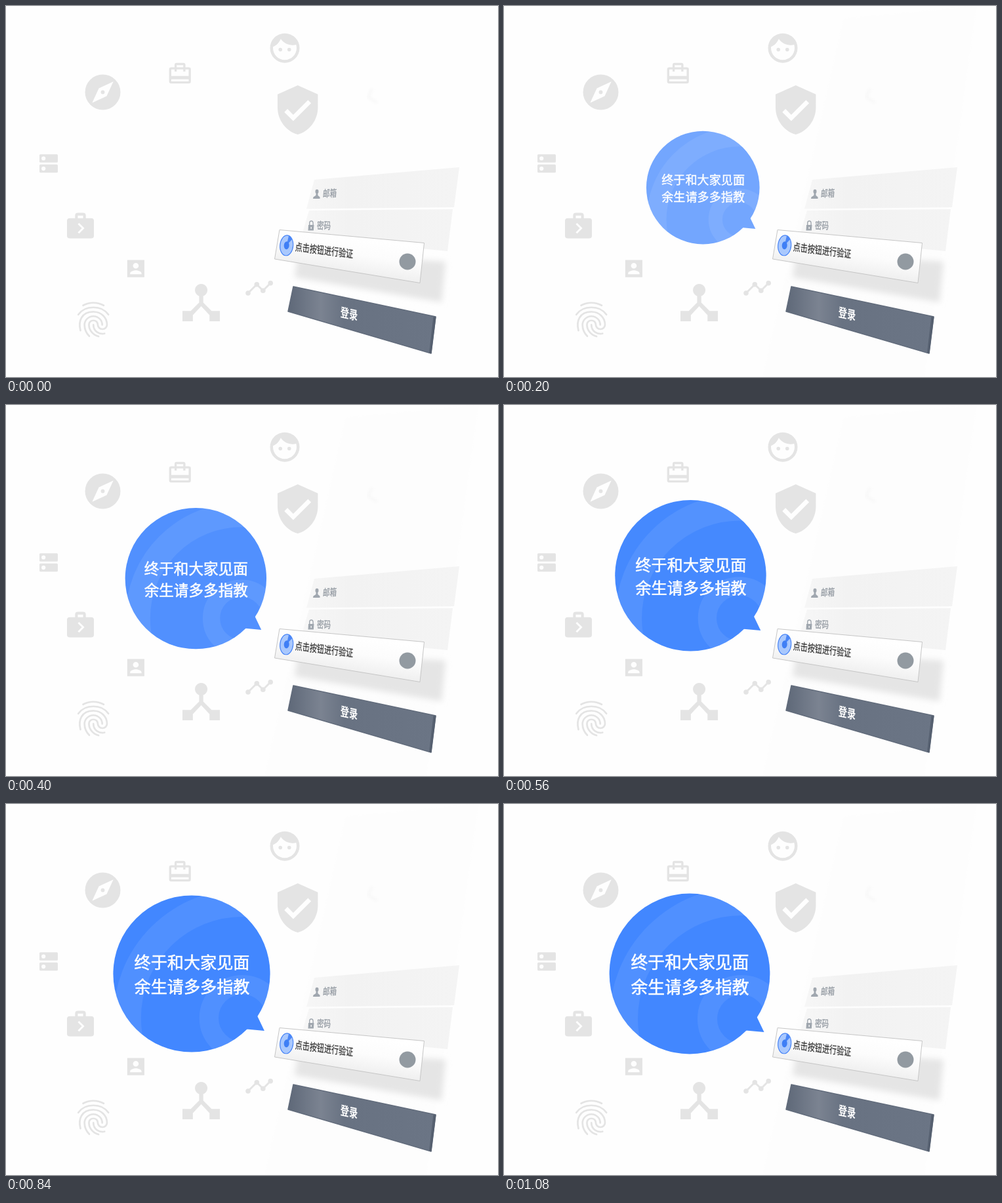
An HTML page for the animation above (2.4 s loop, 750x566 px).

```html
<!DOCTYPE html>
<html lang="zh">
<head>
<meta charset="utf-8">
<title>登录验证</title>
<style>
  html, body { margin: 0; width: 100%; height: 100%; overflow: hidden; background: #fefefe; }
  svg { display: block; width: 100%; height: 100%; }
  text { font-family: "Noto Sans CJK SC", "Noto Sans CJK", sans-serif; text-anchor: middle; }
</style>
</head>
<body>
<svg viewBox="0 0 750 566">
  <defs>
    <filter id="soft" x="-20%" y="-40%" width="140%" height="180%"><feGaussianBlur stdDeviation="5"/></filter>
    <filter id="faint"><feGaussianBlur stdDeviation="2"/></filter>
    <linearGradient id="field"><stop offset="0" stop-color="#f7f7f7"/><stop offset=".3" stop-color="#f2f2f2"/><stop offset="1" stop-color="#f4f4f4"/></linearGradient>
    <linearGradient id="card" gradientUnits="userSpaceOnUse" x1="527" y1="351" x2="519" y2="404"><stop offset="0" stop-color="#fff"/><stop offset=".5" stop-color="#fcfcfc"/><stop offset="1" stop-color="#f0f0f0"/></linearGradient>
    <linearGradient id="button"><stop offset="0" stop-color="#5e6878"/><stop offset=".12" stop-color="#6e7786"/><stop offset=".22" stop-color="#7b8391"/><stop offset=".38" stop-color="#687282"/><stop offset="1" stop-color="#6b7585"/></linearGradient>
    <clipPath id="disc"><circle r="122.400"/></clipPath>
  </defs>

  <rect width="750" height="566" fill="#fefefe"/>
  <path id="panel" d="M518 20 L720 0 L640 566 H395 Z" fill="#fdfdfd" filter="url(#faint)"/>
  <path d="M558 126 L552 139 L566 148" fill="none" stroke="#f6f6f6" stroke-width="3" filter="url(#faint)"/>

  <!-- Grey icons, each on a 24-unit grid -->
  <g fill="#e4e4e4" fill-rule="evenodd">
    <path transform="translate(398 37.2) scale(2.25)" d="M9 11.75a1.25 1.25 0 1 0 0 2.5 1.25 1.25 0 0 0 0-2.5zm6 0a1.25 1.25 0 1 0 0 2.5 1.25 1.25 0 0 0 0-2.5zM12 2a10 10 0 1 0 0 20 10 10 0 0 0 0-20zm0 18c-4.41 0-8-3.59-8-8 0-.29.02-.58.05-.86 2.36-1.05 4.23-2.98 5.21-5.37C11.07 8.33 14.05 10 17.42 10c.78 0 1.53-.09 2.25-.26.21.71.33 1.47.33 2.26 0 4.41-3.59 8-8 8z"/>
    <path transform="translate(115.1 99.1) scale(2.7)" d="M12 10.9a1.1 1.1 0 1 0 0 2.2 1.1 1.1 0 0 0 0-2.2zM12 2a10 10 0 1 0 0 20 10 10 0 0 0 0-20zm2.19 12.19L6 18l3.81-8.19L18 6z"/>
    <path transform="translate(245.3 83.500) scale(1.66)" d="M20 6h-3V4a2 2 0 0 0-2-2H9a2 2 0 0 0-2 2v2H4a2 2 0 0 0-2 2v11a2 2 0 0 0 2 2h16a2 2 0 0 0 2-2V8a2 2 0 0 0-2-2zM9 4h6v2H9zm11 15H4v-2h16zm0-5H4V8h3v2h2V8h6v2h2V8h3z"/>
    <path transform="translate(403.8 117.6) scale(3.41)" d="M12 1L3 5v6c0 5.55 3.84 10.74 9 12 5.16-1.26 9-6.45 9-12V5zm-2 16l-4-4 1.41-1.41L10 14.17l6.59-6.59L18 9z"/>
    <path transform="translate(46.3 221.6) scale(1.556)" d="M4 13h16a1 1 0 0 1 1 1v6a1 1 0 0 1-1 1H4a1 1 0 0 1-1-1v-6a1 1 0 0 1 1-1zm3 2a2 2 0 1 0 0 4 2 2 0 0 0 0-4zM4 3h16a1 1 0 0 1 1 1v6a1 1 0 0 1-1 1H4a1 1 0 0 1-1-1V4a1 1 0 0 1 1-1zm3 2a2 2 0 1 0 0 4 2 2 0 0 0 0-4z"/>
    <path transform="translate(88.9 309.4) scale(2.05)" d="M20 7h-4V5a2 2 0 0 0-2-2h-4a2 2 0 0 0-2 2v2H4a2 2 0 0 0-2 2v11a2 2 0 0 0 2 2h16a2 2 0 0 0 2-2V9a2 2 0 0 0-2-2zM10 5h4v2h-4zm1 13.5l-1-1 3-3-3-3 1-1 4 4z"/>
    <path transform="translate(180.5 383.2) scale(1.45)" d="M3 3h18v18H3zm12 6a3 3 0 1 0-6 0 3 3 0 0 0 6 0zm-9 8v1h12v-1c0-2-4-3.1-6-3.1S6 15 6 17z"/>
    <path transform="translate(259.5 414.5) scale(3.17)" d="M17 16l-4-4V8.82a3 3 0 1 0-2 0V12l-4 4H3v5h5v-3.05l4-4.2 4 4.2V21h5v-5z"/>
    <g transform="translate(363.3 407.6) scale(1.9)">
      <path d="M3 16l7-7 5 5 6-6" fill="none" stroke="#e4e4e4" stroke-width="1.5"/>
      <circle cx="3" cy="16" r="2"/><circle cx="10" cy="9" r="2"/><circle cx="15" cy="14" r="2"/><circle cx="21" cy="8" r="2"/>
    </g>
    <path transform="translate(100.800 446) scale(2.7)" fill="none" stroke="#e4e4e4" stroke-linecap="round" d="M6.2 4C8 3 9.9 2.5 12 2.5s3.9.5 5.8 1.5M3.5 9.2C5.4 6.5 8.5 5.1 12 5.1s6.6 1.4 8.5 4.1M4.7 18.2C3.3 12.7 5.4 7.6 12 7.6c4.4 0 7.7 3.3 7.7 7.3 0 1.4-1.1 2.5-2.6 2.5s-2.6-1.1-2.6-2.5-1.1-2.4-2.5-2.4-2.5 1-2.5 2.4c0 3.3 2.4 5.8 5.4 6.6M9.7 21.4c-1.7-1.7-2.7-3.5-2.7-6.4 0-2.7 2.3-4.9 5-4.9s5 2.2 5 4.9M12 14.9c0 2 1 3.5 2.3 4.3 1.2.8 2.5 1 4 .7"/>
  </g>

  <!-- Login form -->
  <path d="M470 265 L691 246 L683 307 L458 309.500 Z M462 312 L681 310 L673 374 L450 352 Z" fill="url(#field)"/>
  <g fill="#a0a7af">
    <ellipse cx="474" cy="283" rx="2.500" ry="3.200"/>
    <path d="M472.800 285h2.400l.3 4 3 2.500v2.500h-10.500l.5-2.500 3.800-2.500z"/>
    <path fill-rule="evenodd" d="M461 334h8.500l-.6 8.500h-8.400zM464.500 337v3h1.400v-3z"/>
    <path d="M462.700 334v-2.500a2.700 3.500 0 0 1 5.400 0v2.500" fill="none" stroke="#a0a7af" stroke-width="1.400"/>
  </g>
  <g fill="#9299a1" stroke="#9299a1" stroke-width=".3" font-size="15">
    <text transform="matrix(.7 -.03 -.06 1 493.500 285.500)" y="5.700">邮箱</text>
    <text transform="matrix(.7 .01 -.06 1 484.500 334.700)" y="5.700">密码</text>
  </g>
  <path d="M446 376 L670 390 L664 452 L440 414 Z" fill="#e5e5e5" filter="url(#soft)"/>
  <path d="M417 341.500 L637.500 361.500 L631 422.500 L409.500 386 Z" fill="url(#card)" stroke="#c6c6c6" stroke-linejoin="round"/>
  <g transform="translate(427.700 365.300) rotate(5)">
    <ellipse rx="10" ry="15.500" fill="#a9c8fd" stroke="#4a86f7" stroke-width="1.200"/>
    <path d="M0 0 L2 -15 A10 15.500 0 0 1 7.500 -10 Z" fill="#4a86f7"/>
    <ellipse rx="4" ry="6" fill="#3f7ff5"/>
  </g>
  <text transform="matrix(.69 .088 -.06 1 485 372.700)" y="6" font-size="16" fill="#333" stroke="#333" stroke-width=".25">点击按钮进行验证</text>
  <circle cx="612" cy="390" r="12.500" fill="#929aa1"/>
  <path d="M438 428 L655 474 L648 530 L430 466 Z" fill="url(#button)" stroke="#626c7c" stroke-width="1.500" stroke-linejoin="round"/>
  <path d="M651.500 473.500 L655.500 474.500 L648.500 530 L645 529 Z" fill="#566070"/>
  <text transform="matrix(.69 .15 -.05 1 523 469.500)" y="7.200" font-size="19" font-weight="700" fill="#fff">登录</text>

  <!-- Speech bubble, centred on its own disc -->
  <g id="bubble">
    <path d="M102 65 L113.500 89 L80 86 Z" fill="#4287ff"/>
    <circle r="122.400" fill="#4287ff"/>
    <g clip-path="url(#disc)" fill="none" stroke="#fff" stroke-opacity=".075">
      <circle cx="79" cy="69" r="52" stroke-width="30"/>
      <circle cx="79" cy="69" r="179.500" stroke-width="43"/>
    </g>
    <g fill="#fff" stroke="#fff" stroke-width=".6" font-size="25.700">
      <text x=".5" y="-7.800">终于和大家见面</text>
      <text x=".5" y="29.800">余生请多多指教</text>
    </g>
  </g>
</svg>
<script>
  const LOOP = 2400, STEP = 40;
  const bubble = document.getElementById('bubble');
  const panel = document.getElementById('panel');
  const clamp = v => Math.min(1, Math.max(0, v));
  const mix = (a, b, k) => a + (b - a) * k;
  const bezier = (a, b, s) => 3 * s * (1 - s) ** 2 * a + 3 * s * s * (1 - s) * b + s ** 3;

  // Steep ease-out: cubic-bezier(0, .62, .4, 1)
  function easeOut(u) {
    let low = 0, high = 1;
    for (let i = 0; i < 24; i++) {
      const mid = (low + high) / 2;
      if (bezier(0, 0.4, mid) < u) low = mid; else high = mid;
    }
    return bezier(0.62, 1, high);
  }

  function draw(time) {
    const t = Math.floor((time % LOOP) / STEP) * STEP;
    const pop = t ? easeOut(clamp(t / 720)) : 0;
    const swell = 1 - (1 - clamp((t - 760) / 320)) ** 2;
    const radius = 118 * pop + 5 * swell;
    const x = mix(359.5, 283, pop), y = mix(327.4, 259, pop);
    bubble.setAttribute('transform', `translate(${x} ${y}) scale(${radius / 123})`);
    bubble.setAttribute('opacity', pop);
    panel.setAttribute('opacity', t ? 1 : 0);
  }

  const start = performance.now();
  function tick() {
    draw(performance.now() - start);
    requestAnimationFrame(tick);
  }
  tick();
</script>
</body>
</html>
```
